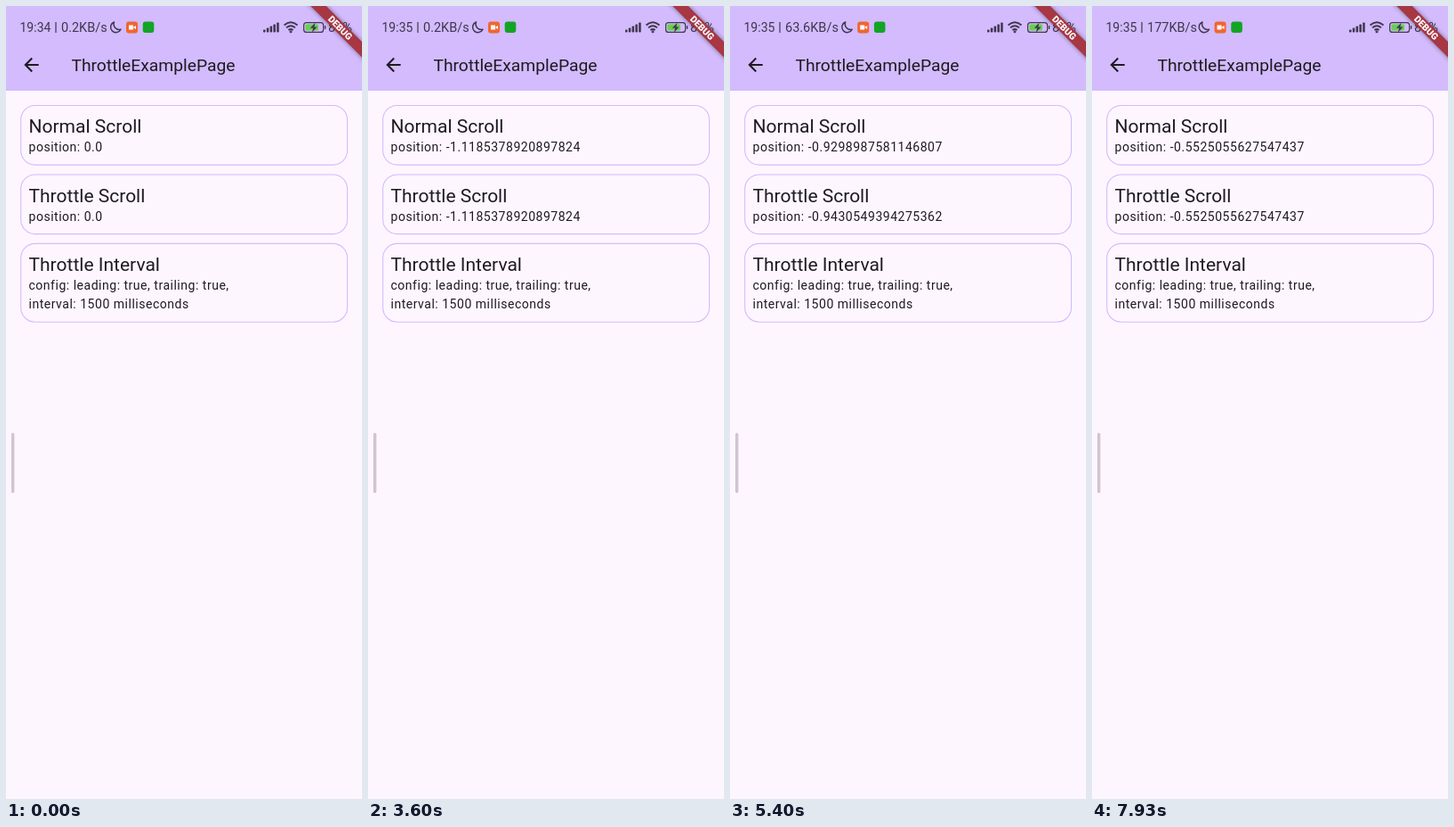
These frames come from a looping animation (400 px wide and 889 px high, 8000 ms). An HTML page:

```html
<!DOCTYPE html>
<html lang="en">
<head>
<meta charset="utf-8">
<title>ThrottleExamplePage</title>
<style>
  html, body { margin: 0; width: 100%; height: 100%; overflow: hidden; background: #fef6ff; }
  svg { display: block; width: 100%; height: 100%; }
  text { font-family: Roboto, sans-serif; fill: #1d1b20; white-space: pre; }
  .heading { font-size: 21.02px; }
  .body { font-size: 14.02px; letter-spacing: .51px; }
  .status, .status text { fill: #40364f; font-size: 14.5px; }
  .card { fill: none; stroke: #d3bbfd; stroke-width: 1.1; }
</style>
</head>
<body>
<svg viewBox="0 0 400 889">
  <defs>
    <filter id="blur" x="-20%" y="-100%" width="140%" height="300%"><feGaussianBlur stdDeviation="2.5"/></filter>
  </defs>
  <rect width="400" height="889" fill="#fef6ff"/>
  <rect width="400" height="95" fill="#d3bbfd"/>

  <g class="status">
    <text id="clock" x="15.5" y="29" style="font-size:14px"></text>
    <rect x="55.4" y="18" width="1.2" height="12"/>
    <text id="speed" x="62" y="29"></text>
    <g id="icons">
      <path d="M121.5 18A6 6 0 1 0 129 26.2A6.2 6.2 0 0 1 121.5 18Z" fill="none" stroke="#40364f" stroke-width="1.5" stroke-linejoin="round"/>
      <rect x="135" y="17.5" width="13" height="13" rx="3" fill="#f2652e"/>
      <path d="M138 21.5h5v5h-5zM143.5 23.5l2.5-1.5v4l-2.5-1.5z" fill="#fff"/>
      <rect x="153.7" y="17.5" width="12.6" height="12.6" rx="3" fill="#13a425"/>
    </g>
    <g id="signal"></g>
    <g fill="none" stroke="#40364f" stroke-width="1.9">
      <path d="M312.5 21.5Q320 15 327.5 21.5M315 24.4Q320 20 325 24.4M317.4 27.1Q320 25 322.6 27.1"/>
      <circle cx="320" cy="28.8" r=".6"/>
    </g>
    <rect x="334.6" y="18.6" width="22" height="10.8" rx="3" fill="none" stroke="#40364f" stroke-width="1.2"/>
    <rect x="336.4" y="20.4" width="14.5" height="7.2" rx="1.3" fill="#67cf50"/>
    <rect x="357.8" y="22" width="1.5" height="4" rx=".7"/>
    <path d="M347.5 18.5l-5.6 6.3h3.2l-1.2 5 5.6-6.4h-3.2z"/>
    <text x="362" y="29">80%</text>
  </g>

  <g transform="translate(400 0) rotate(45) scale(1.0186)">
    <rect x="-60" y="28" width="120" height="12" fill="#000" opacity=".45" filter="url(#blur)"/>
    <rect x="-60" y="28" width="120" height="12" fill="#a63743"/>
    <text y="37.6" text-anchor="middle" style="font-size:10.2px;font-weight:900;fill:#fff">DEBUG</text>
  </g>

  <path transform="translate(16.3 53.8) scale(1.0186)" fill="#1d1b20"
    d="M20 11H7.83l5.59-5.59L12 4l-8 8 8 8 1.41-1.41L7.83 13H20z"/>
  <text x="73.4" y="72.7" style="font-size:19.27px">ThrottleExamplePage</text>

  <rect class="card" x="16.7" y="111.5" width="366.8" height="66.6" rx="16"/>
  <text class="heading" x="25.5" y="142">Normal Scroll</text>
  <text class="body" id="normal" x="25.5" y="163"></text>

  <rect class="card" x="16.7" y="189" width="366.8" height="66.6" rx="16"/>
  <text class="heading" x="25.5" y="219.5">Throttle Scroll</text>
  <text class="body" id="throttled" x="25.5" y="240.6"></text>

  <rect class="card" x="16.7" y="266.4" width="366.8" height="87.8" rx="16"/>
  <text class="heading" x="25.5" y="297">Throttle Interval</text>
  <text class="body" x="25.5" y="318">config: leading: true, trailing: true,</text>
  <text class="body" x="25.5" y="339.4">interval: 1500 milliseconds</text>

  <rect x="6" y="478.5" width="3.4" height="67.5" rx="1.7" fill="#cfc6d2"/>
</svg>
<script>
const LOOP = 8000;
const $ = id => document.getElementById(id);

// Each track lists [start in ms, value]; a value holds until the next start.
const clock = [[0, '19:34'], [1530, '19:35']];
const speed = [[0, '0.2KB/s', 0], [3930, '63.6KB/s', 8.2], [7930, '177KB/s', 2.6]];
const normal = [
  [0, '0.0'],
  [1530, '-0.18863909656360153'],
  [1800, '-0.36375146632840834'],
  [2060, '-0.5525055627547437'],
  [2330, '-0.7412596591810791'],
  [2600, '-0.9159203464728168'],
  [3060, '-1.1185378920897824'],
  [3930, '-1.1045679656728857'],
  [4530, '-0.9430549394275362'],
  [4730, '-0.9298987581146807'],
  [5860, '-0.7412596591810791'],
  [5930, '-0.9298987581146807'],
  [6460, '-0.7412596591810791'],
  [6730, '-0.5525055627547437'],
  [7460, '-0.36375146632840834'],
  [7660, '-0.5525055627547437']
];
const throttled = [
  [0, '0.0'],
  [3060, '-1.1185378920897824'],
  [4530, '-0.9430549394275362'],
  [5860, '-0.7412596591810791'],
  [7930, '-0.5525055627547437']
];

const at = (track, time) => track.findLast(([start]) => start <= time);
const show = (id, text) => {
  if ($(id).textContent !== text) $(id).textContent = text;
};

$('signal').innerHTML = [3, 5, 7, 9, 11].map((height, i) =>
  `<rect x="${289 + i * 3.8}" y="${29.5 - height}" width="2.5" height="${height}" rx=".8"/>`).join('');

function draw(now) {
  const time = now % LOOP;
  const [, rate, shift] = at(speed, time);
  show('clock', at(clock, time)[1]);
  show('speed', rate);
  $('icons').setAttribute('transform', `translate(${shift} 0)`);
  show('normal', 'position: ' + at(normal, time)[1]);
  show('throttled', 'position: ' + at(throttled, time)[1]);
}

const begin = performance.now();
function tick() {
  draw(performance.now() - begin);
  requestAnimationFrame(tick);
}
tick();
</script>
</body>
</html>
```
